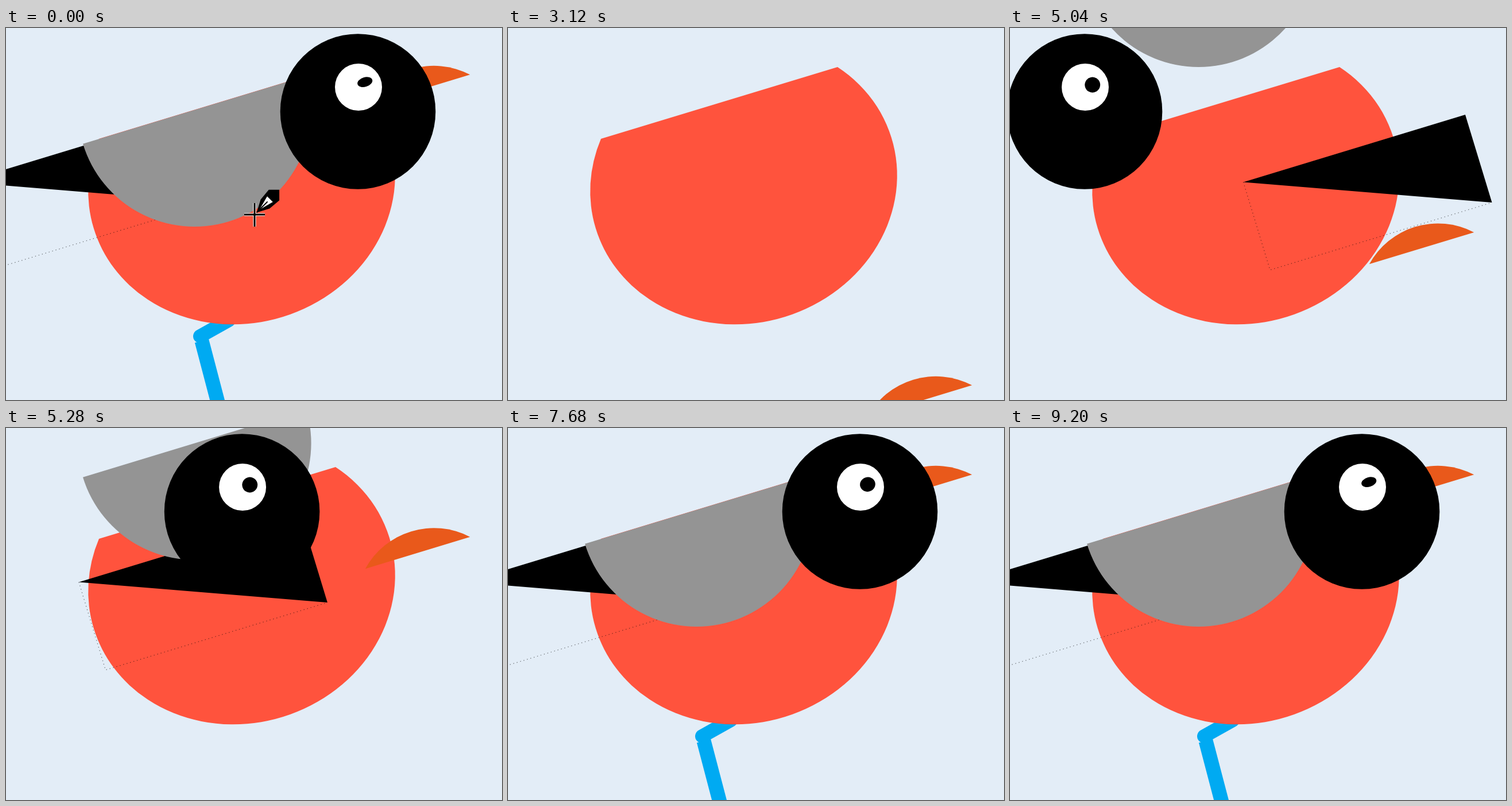
An HTML page with a canvas that plays this animation: 864x648 px, repeating every 9280 ms.

```html
<!DOCTYPE html>
<html lang="en">
<head>
<meta charset="utf-8">
<title>Bird</title>
<style>
  html, body { margin: 0; width: 100%; height: 100%; overflow: hidden; background: #e3edf7; }
  canvas { display: block; }
</style>
</head>
<body>
<canvas id="stage" width="864" height="648"></canvas>
<script>
const ctx = document.getElementById('stage').getContext('2d');
const LOOP = 9280, STEP = 80;
const RESET = 3120, ENTER = 4690, ENTER_TIME = 1240, HALFWAY = 0.2863;
const BLINK = 6280, BLINK_TIME = 2960;
const CURSOR_LEG = 720, PEN_TIME = 560;
const TILT = -16.9 * Math.PI / 180;

const clamp = x => Math.max(0, Math.min(1, x));
const mix = (a, b, f) => a + (b - a) * f;

// Share of the entrance still to travel: 1 at the start, 0.5 at HALFWAY, 0 at the end
function remaining(t, power = 1.35) {
  if (t < RESET) return 0;
  const x = clamp((t - ENTER) / ENTER_TIME);
  return 0.5 ** (Math.log(1 - x ** power) / Math.log(1 - HALFWAY ** power));
}

function at(x, y, draw, angle = 0) {
  ctx.save();
  ctx.translate(x, y);
  ctx.rotate(angle);
  draw();
  ctx.restore();
}

function ellipse(color, x, y, rx, ry = rx) {
  ctx.fillStyle = color;
  ctx.beginPath();
  ctx.ellipse(x, y, rx, ry, 0, 0, 2 * Math.PI);
  ctx.fill();
}

function path(points) {
  ctx.beginPath();
  for (const [x, y] of points) ctx.lineTo(x, y);
}

function polygon(color, points) {
  ctx.fillStyle = color;
  path(points);
  ctx.closePath();
  ctx.fill();
}

function line(color, width, points, cap = 'butt') {
  ctx.strokeStyle = color;
  ctx.lineWidth = width;
  ctx.lineCap = cap;
  path(points);
  ctx.stroke();
}

// Tilted ellipse, cut straight at height `cut` above or below its centre
function segment(color, x, y, rx, ry, cut, upper = false) {
  const a = Math.asin(cut / ry);
  at(x, y, () => {
    ctx.fillStyle = color;
    ctx.beginPath();
    ctx.ellipse(0, 0, rx, ry, 0, a, Math.PI - a, upper);
    ctx.closePath();
    ctx.fill();
  }, TILT);
}

function leg() {
  line('#00aaf2', 24, [[388, 509], [338, 537]], 'round');
  line('#00aaf2', 25, [[341, 545], [394, 747]]);
}

function body() {
  segment('#ff533d', 410.5, 270.5, 269.4, 243.5, -146.3);
}

// Half of a tilted box, with the other half's edge dotted
function tail() {
  const w = 404, h = 160;
  at(-74, 268.4, () => {
    polygon('#000', [[0, 0], [w, 0], [w, h]]);
    ctx.setLineDash([1.4, 4.8]);
    line('rgba(0,0,0,.5)', 1.3, [[0, 0], [0, h], [w, h]]);
  }, TILT);
}

function wing() {
  segment('#949494', 328.4, 142.8, 203.2, 203.2, 0);
}

function beak() {
  segment('#e9591b', 745.3, 201.8, 136, 136, -97, true);
}

// Speeds up while closing, then reopens the same way
function blink(t) {
  if (t >= RESET && t < BLINK) return 0;
  const age = (t - BLINK + LOOP) % LOOP;
  return clamp(1 - Math.abs(age / BLINK_TIME - 1)) ** 2.5;
}

function head(t) {
  const lid = 5.25 * blink(t);
  ellipse('#000', 613, 145.5, 135.3);
  ellipse('#fff', 614, 103, 41);
  at(626.7, 99, () => ellipse('#000', 0, -lid, 13.4, 13.4 - lid), TILT);
}

function pen() {
  at(0, 0, () => {
    polygon('#000', [[5, 0], [26, -11], [48, -13], [61, 0], [48, 13], [26, 11]]);
    polygon('#fff', [[12, 0], [38, -7], [38, 7]]);
    line('#000', 2, [[5, 0], [32, 0]]);
  }, -Math.PI / 4);
  for (const [color, width] of [['#fff', 5], ['#000', 3]]) {
    line(color, width, [[-18, 0], [18, 0]]);
    line(color, width, [[0, -20], [0, 21]]);
  }
}

function arrow() {
  polygon('#fff', [[1, 2], [1, 39], [10, 31], [17, 46], [24, 43], [17, 29], [28, 29]]);
  ctx.lineJoin = 'round';
  ctx.strokeStyle = '#000';
  ctx.lineWidth = 2.4;
  ctx.stroke();
}

// Cursor rests, one every CURSOR_LEG
const rests = [[433, 325], [600, 275], [666, 268], [660, 275], [324, 268]];

function cursor(t) {
  if (t >= RESET) return;
  const leg = Math.min(t / CURSOR_LEG, rests.length - 1.001);
  const i = Math.floor(leg), f = leg - i, ease = f * f * (3 - 2 * f);
  const [x, y] = rests[i].map((v, k) => mix(v, rests[i + 1][k], ease));
  at(x, y, t < PEN_TIME ? pen : arrow);
}

function render(t) {
  const rest = remaining(t);
  ctx.fillStyle = '#e3edf7';
  ctx.fillRect(0, 0, 864, 648);
  at(0, 720 * rest, leg);
  body();
  at(947 * rest, 0, tail);
  at(0, -548 * rest, wing);
  at(0, 541 * remaining(t, 1.43), beak);
  at(-952 * rest, 0, () => head(t));
  cursor(t);
}

const start = performance.now();
function tick() {
  const t = (performance.now() - start) % LOOP;
  render(Math.floor(t / STEP) * STEP);
  requestAnimationFrame(tick);
}
tick();
</script>
</body>
</html>
```
